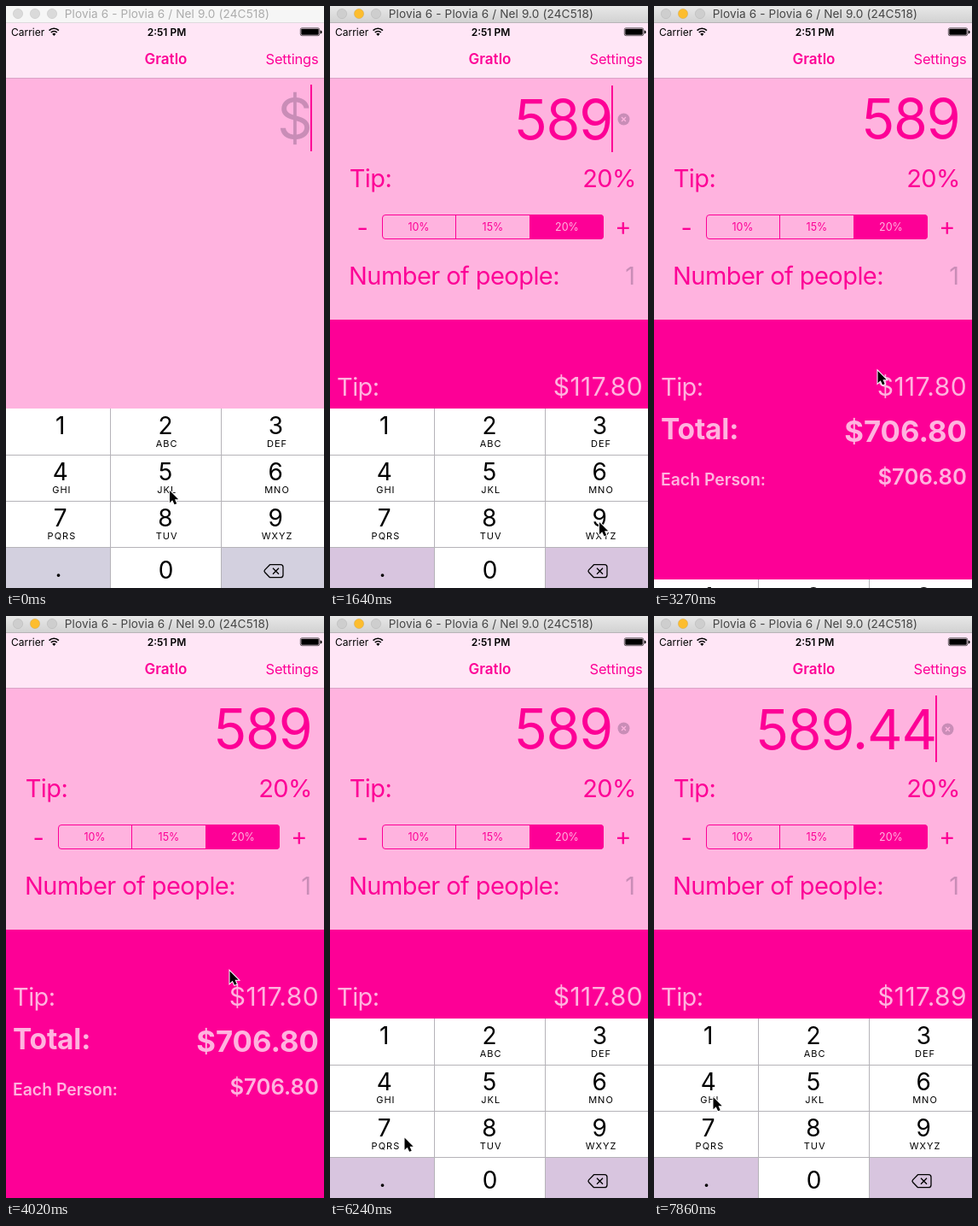
Write an HTML page that moves like this. It is 373 by 681 pixels and loops after 8000 ms.

```html
<!DOCTYPE html>
<html lang="en">
<head>
<meta charset="utf-8">
<title>Tip calculator</title>
<style>
  html, body { margin: 0; width: 373px; height: 681px; overflow: hidden; }
  svg { display: block; font-family: Inter, Roboto, "Liberation Sans", sans-serif; }
  .pink { fill: #fd0096; }
  .pale { fill: #ffb3df; }
  .faint { fill: #c98db7; }
  .end { text-anchor: end; }
  .mid { text-anchor: middle; }
  .bold { font-weight: 600; }
  .heavy { font-weight: 700; }
  .label { font-size: 29px; letter-spacing: -.56px; }
  .money { font-size: 30px; letter-spacing: .4px; }
  .big { font-size: 64.5px; letter-spacing: -1.2px; }
  .seg { font-size: 12.5px; }
  .digit { font-size: 28px; }
  .letters { font-size: 11px; letter-spacing: 1px; }
</style>
</head>
<body>
<svg width="373" height="681" viewBox="0 0 373 681">
  <defs>
    <linearGradient id="chrome" x2="0" y2="1">
      <stop stop-color="#e8e8e8"/><stop offset="1" stop-color="#d2d2d2"/>
    </linearGradient>
  </defs>
  <rect class="pale" width="373" height="681"/>

  <g id="details">
    <text class="label pink" x="22.7" y="211.5">Tip:</text>
    <text class="label pink end" x="359" y="211.5">20%</text>
    <text class="label pink mid" x="38" y="270">-</text>
    <text class="label pink mid" x="343.5" y="267.5">+</text>
    <rect x="61.5" y="244.5" width="259" height="28" rx="3.5" fill="none" stroke="#fd0096"/>
    <path class="pink" d="M147 244h1v28h-1zM234 244h83a4 4 0 0 1 4 4v21a4 4 0 0 1-4 4h-83z"/>
    <text class="seg pink mid" x="104" y="263">10%</text>
    <text class="seg pink mid" x="191" y="263">15%</text>
    <text class="seg pale mid" x="278" y="263">20%</text>
    <text class="label pink" x="22" y="325.5">Number of people:</text>
    <text class="label faint end" x="357.5" y="325.5">1</text>

    <rect class="pink" y="367" width="373" height="314"/>
    <text class="label pale" x="8" y="456.3">Tip:</text>
    <text class="money pale end" id="tip" x="367" y="456.3"></text>
    <g class="pale bold">
      <text class="heavy" x="8" y="506.5" font-size="33.5" letter-spacing="-.2">Total:</text>
      <text class="end total heavy" x="367" y="509.5" font-size="34.7"></text>
      <text x="8" y="560.5" font-size="19.4">Each Person:</text>
      <text class="end total" x="367" y="560" font-size="25.7"></text>
    </g>
  </g>

  <g id="field">
    <text class="big end" id="bill" y="155"></text>
    <rect class="pink" id="caret" y="92" width="2" height="78"/>
    <g id="clear">
      <circle class="faint" cx="344.5" cy="131.5" r="7"/>
      <path d="M342 129l5 5m0-5l-5 5" stroke="#ffb3df" stroke-width="1.3"/>
    </g>
  </g>

  <rect y="19" width="373" height="65" fill="#ffe6f6"/>
  <rect y="84" width="373" height="1" fill="#d9a3c6"/>
  <text x="6" y="35" font-size="12">Carrier</text>
  <g fill="none" stroke="#000" stroke-width="1.7">
    <path d="M50.6 28.6a8 8 0 0 1 11.3 0M52.8 31a5 5 0 0 1 7 0"/>
  </g>
  <path d="M54.2 32.8a3 3 0 0 1 4.2 0l-2.1 2.2z"/>
  <text class="mid bold" x="188.5" y="35" font-size="12">2:51 PM</text>
  <rect x="345.3" y="25.8" width="22.4" height="8.9" rx="1.8" fill="none" stroke="#000" stroke-width=".6"/>
  <rect x="346.3" y="26.8" width="20.4" height="6.9" rx=".8"/>
  <path d="M368.6 28.5a2 2 0 0 1 0 4z"/>
  <text class="pink mid bold" x="187.5" y="68" font-size="17">Gratlo</text>
  <text class="pink end" x="366.5" y="68" font-size="16.5" letter-spacing="-.2">Settings</text>

  <rect id="bar" width="373" height="19"/>
  <rect id="barEdge" y="19" width="373" height="1"/>
  <g id="lights" stroke="#000" stroke-opacity=".08">
    <circle cx="14" cy="9" r="5.7"/><circle cx="34" cy="9" r="5.7"/><circle cx="54" cy="9" r="5.7"/>
  </g>
  <text id="title" x="68.7" y="14" font-size="13.6" letter-spacing=".12">Plovia 6 - Plovia 6 / Nel 9.0 (24C518)</text>

  <g id="keyboard"></g>
  <path id="mouse" d="M0 0V14.2L3.2 11.2L5.6 16.3L8.2 15.2L6 10.2H10.2Z" stroke="#fff" stroke-width="2" style="paint-order: stroke"/>
</svg>
<script>
const $ = id => document.getElementById(id);
const LOOP = 8000, STEPS = 54;
const GREY_KEY = '#d8c5df';

// Each track lists [step, value...]; a value holds until the next entry.
const tracks = {
  bill: [[0, ''], [3, '5'], [7, '58'], [11, '589'], [46, '589.'], [51, '589.4'], [53, '589.44']],
  focus: [[0, true], [21, false], [38, true]],
  caret: [[0, true], [14, false], [17, true], [41, false], [44, true]],
  fade: [[0, 0], [3, .5], [4, 1]],
  settle: [[0, 0], [3, 2], [4, 1.5], [5, 0], [7, 1], [8, 0], [11, 1], [12, 0],
    [46, 1], [47, 0], [51, 1], [52, 0], [53, 1]],
  slide: [[0, 0], [21, 146], [22, 200], [23, 210], [38, 64], [39, 6], [40, 0]],
  mouse: [[0, 192, 567], [5, 191, 585], [6, 189, 603], [8, 250, 604], [9, 316, 604],
    [14, 314, 590], [15, 300, 520], [16, 276, 452], [17, 264, 432], [18, 262.5, 427],
    [27, 262.5, 415.5], [28, 288, 340], [29, 335, 205], [30, 362, 115], [31, 360, 119],
    [35, 342, 133], [36, 332.5, 139], [40, 285, 255], [41, 150, 500], [42, 87.5, 610.5],
    [43, 76, 642], [44, 70, 661], [47, 70, 579], [49, 69.5, 563]]
};
const at = (name, step) => tracks[name].findLast(k => k[0] <= step).slice(1);

function buildKeyboard() {
  const letters = ['', 'ABC', 'DEF', 'GHI', 'JKL', 'MNO', 'PQRS', 'TUV', 'WXYZ'];
  const mids = [63.7, 187, 316.3];
  let s = `<rect y="471" width="373" height="210" fill="#fff"/>
    <rect class="grey" y="634" width="122" height="47"/>
    <rect class="grey" x="253" y="634" width="120" height="47"/>
    <rect id="pressed" y="526" width="122" height="53" fill="${GREY_KEY}"/>
    <path d="M0 525.5H373M0 579.5H373M0 633.5H373M122.5 471V681M252.5 471V681" stroke="#b5b3b8"/>`;
  letters.forEach((word, i) => {
    const x = mids[i % 3], y = 501 + 53.8 * Math.floor(i / 3);
    s += `<text class="digit mid" x="${x}" y="${y}">${i + 1}</text>
      <text class="letters mid" x="${x + 1.7}" y="${y + 15}">${word}</text>`;
  });
  s += `<text class="digit mid" x="187.5" y="670">0</text>
    <text class="digit mid" x="61.5" y="668">.</text>
    <path d="M309.5 653.7H322a3 3 0 0 1 3 3v9a3 3 0 0 1-3 3H309.5L303.5 662.5a2 2 0 0 1 0-2.6zM313 657.7l7 7m0-7l-7 7"
      fill="none" stroke="#000" stroke-width="1.3" stroke-linejoin="round"/>`;
  $('keyboard').innerHTML = s;
}

const show = (el, on) => el.setAttribute('visibility', on ? 'visible' : 'hidden');
const move = (el, x, y) => el.setAttribute('transform', `translate(${x} ${y})`);
const fill = (el, color) => el.setAttribute('fill', color);
const dollars = v => '$' + v.toFixed(2);

function draw(step) {
  const [bill] = at('bill', step), [focus] = at('focus', step);
  const amount = Number(bill), active = step >= 2;

  fill($('bar'), active ? 'url(#chrome)' : '#f6f6f6');
  fill($('barEdge'), active ? '#b8b4b7' : '#dedade');
  fill($('title'), active ? '#454545' : '#acacac');
  [...$('lights').children].forEach((c, i) =>
    fill(c, !active ? '#dadada' : i === 1 ? '#fdbd2f' : '#cecece'));

  $('details').setAttribute('opacity', at('fade', step)[0]);
  $('tip').textContent = dollars(amount * .2);
  document.querySelectorAll('.total').forEach(e => e.textContent = dollars(amount * 1.2));

  const clearable = focus && bill !== '';
  $('bill').textContent = bill || '$';
  $('bill').setAttribute('class', 'big end ' + (bill ? 'pink' : 'faint'));
  $('bill').setAttribute('x', clearable ? 331 : 358.5);
  $('caret').setAttribute('x', clearable ? 330 : 357);
  show($('caret'), focus && at('caret', step)[0]);
  show($('clear'), clearable);
  move($('field'), 0, at('settle', step)[0]);

  move($('keyboard'), 0, at('slide', step)[0]);
  document.querySelectorAll('.grey').forEach(e => fill(e, step < 3 ? '#d3d0df' : GREY_KEY));
  show($('pressed'), step === 50);
  move($('mouse'), ...at('mouse', step));
}

buildKeyboard();
const start = performance.now();
let last = -1;
function tick() {
  const t = (performance.now() - start) % LOOP;
  const step = Math.min(STEPS - 1, Math.floor((t + 4) * STEPS / LOOP));
  if (step !== last) draw(last = step);
  requestAnimationFrame(tick);
}
tick();
</script>
</body>
</html>
```
